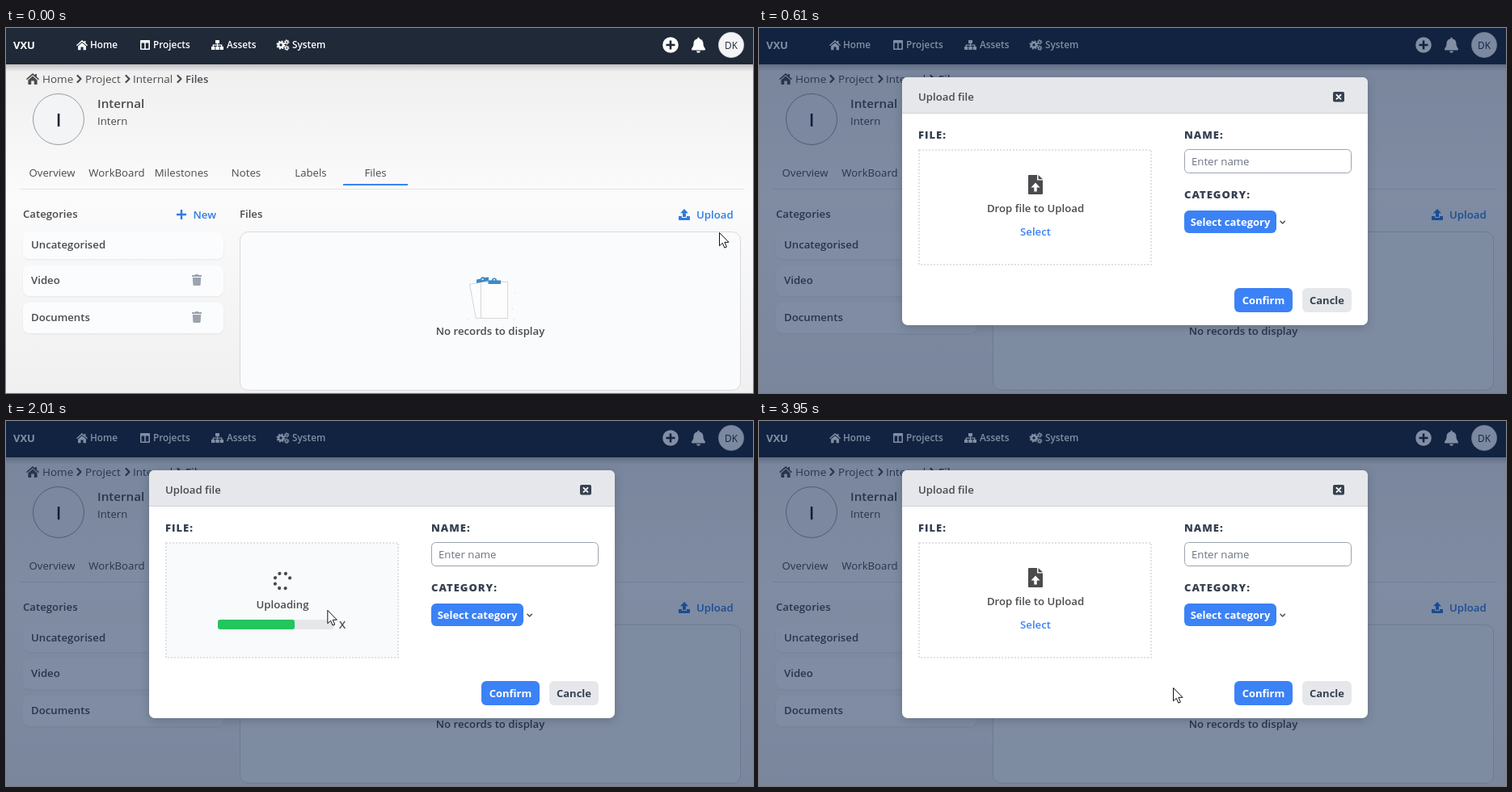
Animation of 924 by 452 pixels, one loop 4030 ms. Source, as an HTML page:

```html
<!DOCTYPE html>
<html lang="en">
<head>
<meta charset="utf-8">
<title>Upload file</title>
<style>
html, body { margin: 0; width: 100%; height: 100%; overflow: hidden; }
svg { display: block; }
text { font: 600 13.2px "Open Sans", "Noto Sans", sans-serif; fill: #4b4b4d; }
.mid { text-anchor: middle; }
.nav text { font-size: 11.8px; fill: #fff; }
.crumb text { font-weight: 400; font-size: 13.5px; }
.light text, text.light { font-weight: 400; }
.caps { font-weight: 800; font-size: 13px; letter-spacing: 1px; fill: #374151; }
.bold { font-weight: 700; font-size: 13px; }
text.blue { fill: #2f7de1; }
text.link { fill: #3b82f6; }
text.white { fill: #fff; }
.line { fill: none; stroke-linecap: round; stroke-linejoin: round; }
.card { fill: #fbfcfd; filter: drop-shadow(0 1px 1px rgba(0,0,0,.06)); }
</style>
</head>
<body>
<svg width="924" height="452" viewBox="0 0 924 452">
<defs>
  <linearGradient id="paper" x2="0" y2="1">
    <stop stop-color="#efeff0"/><stop offset=".4" stop-color="#fbfbfc"/><stop offset="1" stop-color="#f0f0f1"/>
  </linearGradient>
  <linearGradient id="shade" x2="0" y2="1">
    <stop stop-color="#000" stop-opacity=".2"/><stop offset="1" stop-color="#000" stop-opacity="0"/>
  </linearGradient>
  <linearGradient id="glass" x2="0" y2="1">
    <stop stop-color="#eff8fc"/><stop offset="1" stop-color="#cdebf5"/>
  </linearGradient>
  <path id="house" d="M0 7 8 0 11 2.6V1H13V4.4L16 7 15 8.2 8 2.2 1 8.2ZM2.4 8.4 8 3.6 13.6 8.4V14H9.8V9.6H6.2V14H2.4Z"/>
  <path id="chevron" class="line" d="M0 0 4 4 0 8" stroke="#4b4b4d" stroke-width="2.2"/>
  <path id="trash" fill="#9ca3af" d="M0 1H3.6L4.4 0H7.6L8.4 1H12V3H0ZM.8 4H11.2L10.6 13Q10.5 14 9.5 14H2.5Q1.5 14 1.4 13Z"/>
</defs>

<g id="page">
  <rect y="45" width="924" height="407" fill="url(#paper)"/>
  <rect y="45" width="924" height="9" fill="url(#shade)"/>
  <rect width="924" height="45" fill="#1f2937"/>
  <g class="nav" fill="#fff">
    <text x="9" y="26" style="font-weight:700;font-size:13px">VXU</text>
    <use href="#house" transform="translate(87 15) scale(.88)"/>
    <text x="104" y="25">Home</text>
    <path fill-rule="evenodd" d="M167 15H177Q178 15 178 16V26Q178 27 177 27H167Q166 27 166 26V16Q166 15 167 15ZM167.6 18.4V25.4H171.2V18.4ZM172.8 18.4V25.4H176.4V18.4Z"/>
    <text x="182" y="25">Projects</text>
    <path d="M259 15H264V19H262.1V20.4H267.4V23H269V27H264.6V23H266V21.8H262.1V23H263.7V27H259.3V23H260.9V21.8H257V23H258.4V27H254V23H255.6V20.4H260.9V19H259Z"/>
    <text x="273" y="25">Assets</text>
    <g fill="none" stroke="#fff">
      <circle cx="340" cy="21" r="3" stroke-width="2.6"/>
      <circle cx="340" cy="21" r="4.7" stroke-width="1.6" stroke-dasharray="2 1.69"/>
      <circle cx="347.2" cy="17.4" r="1.7" stroke-width="1.4"/>
      <circle cx="347.2" cy="17.4" r="2.8" stroke-width="1" stroke-dasharray="1.5 1.43"/>
      <circle cx="347.2" cy="24.8" r="1.7" stroke-width="1.4"/>
      <circle cx="347.2" cy="24.8" r="2.8" stroke-width="1" stroke-dasharray="1.5 1.43"/>
    </g>
    <text x="354" y="25">System</text>
    <circle cx="822" cy="21" r="9.8"/>
    <path d="M822 15.5V26.5M816.5 21H827.5" stroke="#1f2937" stroke-width="2.6"/>
    <path d="M856.5 11.5Q857.7 11.5 857.7 13.2C861.5 14 862.5 17 862.5 19.5 862.5 23.5 865 24.5 865 26.5Q865 27.5 864 27.5H849Q848 27.5 848 26.5C848 24.5 850.5 23.5 850.5 19.5 850.5 17 851.5 14 855.3 13.2Q855.3 11.5 856.5 11.5ZM854 28.5H859A2.5 2.3 0 0 1 854 28.5Z"/>
    <circle cx="897" cy="21" r="15.7" fill="#f3f4f6" stroke="#d1d5db" stroke-width=".6"/>
    <text class="mid" x="897" y="25.5" style="fill:#1f2937;font-weight:400">DK</text>
  </g>

  <g class="crumb">
    <use href="#house" x="25" y="56" fill="#4b4b4d"/>
    <text x="45" y="68">Home</text><use href="#chevron" x="88.5" y="59"/>
    <text x="98" y="68">Project</text><use href="#chevron" x="148.5" y="59"/>
    <text x="157" y="68">Internal</text><use href="#chevron" x="212.5" y="59"/>
    <text x="222" y="68" style="font-weight:600;font-size:13.2px">Files</text>
  </g>
  <circle cx="65" cy="113" r="31.5" fill="#f3f4f6" stroke="#9a9da3"/>
  <text class="mid" x="65" y="122" style="font-size:22px;fill:#172136">I</text>
  <text x="113" y="99" style="font-size:15.2px">Internal</text>
  <text x="113" y="120" class="light">Intern</text>

  <g class="light mid">
    <text x="57" y="184">Overview</text><text x="137" y="184">WorkBoard</text>
    <text x="217" y="184">Milestones</text><text x="297" y="184">Notes</text>
    <text x="377" y="184">Labels</text><text x="457" y="184">Files</text>
  </g>
  <rect x="17" y="199" width="896" height="1" fill="#e2e4e7"/>
  <rect x="417" y="193" width="80" height="2" fill="#3b82f6"/>

  <text x="21" y="235">Categories</text>
  <path d="M217 225V237M211 231H223" stroke="#2f7de1" stroke-width="2.4"/>
  <text x="231.500" y="236" class="blue">New</text>
  <rect class="card" x="21" y="252" width="248" height="34" rx="8"/>
  <rect class="card" x="21" y="294" width="248" height="38" rx="8"/>
  <rect class="card" x="21" y="340" width="248" height="38" rx="8"/>
  <text x="31" y="273">Uncategorised</text>
  <text x="31" y="317">Video</text><use href="#trash" x="230" y="305"/>
  <text x="31" y="363">Documents</text><use href="#trash" x="230" y="351"/>

  <text x="289" y="235">Files</text>
  <rect id="hover" x="823" y="216" width="86" height="28" rx="6" fill="#e5e7eb"/>
  <path fill="#2f7de1" d="M839 224 844 229.300H841V234H837V229.300H834ZM832 233H836V235H842V233H846V237Q846 238 845 238H833Q832 238 832 237Z"/>
  <text x="854" y="236" class="blue">Upload</text>
  <rect x="289.500" y="252.500" width="619" height="196" rx="10" fill="#fafbfc" stroke="#d7dade"/>
  <g stroke="#d4d6d8" fill="#fdfdfd">
    <path d="M573.500 317.500 602 312 609 355 581.500 360Z"/>
    <path d="M587.500 314.500H620.500V359.500H587.500Z"/>
  </g>
  <g fill="#3b8bc6">
    <path d="M582 311.500 587 310.500A3 3 0 0 1 592 309L597 308.500V313L582 316Z"/>
    <path d="M596.500 312.500H601A3 3 0 0 1 607 312.500H612V317H596.500Z"/>
    <path fill="#fff" d="M588.500 310.500h2v1.500h-2ZM603 311h2v1.500h-2Z"/>
  </g>
  <path d="M573 312h1M629 328h1M626 348h1M570 361h1M628 361h1" stroke="#cfd2d5"/>
  <text class="mid" x="599" y="380">No records to display</text>
</g>

<rect id="overlay" width="924" height="452" fill="#051e4b"/>

<g id="dialog">
  <rect x="177" y="61" width="576" height="307" rx="7" fill="#fff" style="filter:drop-shadow(0 3px 6px rgba(0,0,0,.18))"/>
  <path d="M177 106V68Q177 61 184 61H746Q753 61 753 68V106Z" fill="#e5e7eb"/>
  <rect x="177" y="105" width="576" height="1" fill="#cdd1d6"/>
  <text x="197" y="90">Upload file</text>
  <rect x="710" y="79" width="14" height="12.500" rx="2" fill="#374151"/>
  <path class="line" d="M714.500 82.800 719.500 87.800M719.500 82.800 714.500 87.800" stroke="#fff" stroke-width="1.900"/>
  <text class="caps" x="197" y="137">FILE:</text>
  <text class="caps" x="526" y="137">NAME:</text>
  <text class="caps" x="526" y="211">CATEGORY:</text>
  <rect id="zone" x="198" y="151" width="287" height="142" stroke="#dfe1e4" stroke-width="2" stroke-dasharray="2 2"/>
  <rect x="526.500" y="150.500" width="206" height="29" rx="5" fill="#fff" stroke="#9ca3af"/>
  <text x="535" y="170" class="light" style="fill:#6b7280">Enter name</text>
  <rect x="526" y="226" width="114" height="28" rx="6" fill="#3b82f6"/>
  <text class="mid bold white" x="583" y="245">Select category</text>
  <path class="line" d="M645 239.300 647.700 242 650.400 239.300" stroke="#4b5563" stroke-width="1.600"/>
  <rect x="588" y="322" width="72" height="30" rx="6" fill="#3b82f6"/>
  <text class="mid bold white" x="624" y="342">Confirm</text>
  <rect x="672" y="322" width="61" height="30" rx="6" fill="#e5e7eb"/>
  <text class="mid bold" x="702.500" y="342" style="fill:#374151">Cancle</text>

  <g id="drop">
    <path d="M334 182H344V188.500H351V205Q351 206 350 206H334Q333 206 333 205V183Q333 182 334 182ZM345.500 182 351 187.200H345.500Z" fill="#4b4b4d"/>
    <path d="M342 191.500 347.500 197.500H343.700V202.500H340.300V197.500H336.500Z" fill="#fff"/>
    <text class="mid" x="342" y="228">Drop file to Upload</text>
    <text class="mid link" x="342" y="257">Select</text>
  </g>
  <g id="progress">
    <g id="spinner" fill="#4b4b4d"></g>
    <g id="check">
      <circle cx="342" cy="198" r="11.800" fill="#4b4b4d"/>
      <path d="M336 198.500 340.300 202.600 348 194.600" fill="none" stroke="#fff" stroke-width="3"/>
    </g>
    <text id="status" class="mid" x="342" y="232"></text>
    <rect x="262" y="246" width="144" height="12" rx="3" fill="#e5e7eb"/>
    <rect id="bar" x="262" y="246" height="12" rx="3" fill="#22c55e"/>
    <text class="mid" x="416" y="257">X</text>
  </g>
</g>

<g id="pointer">
  <g id="ghost">
    <rect x="-51" y="-93" width="103.500" height="105" rx="1" fill="url(#glass)" stroke="#d3e6ec" opacity=".95" style="filter:drop-shadow(1px 1px 1px rgba(40,90,100,.45))"/>
  </g>
  <circle id="halo" r="11.500" fill="#f6f03c" opacity=".85"/>
  <g id="label">
    <rect x="11" y="13" width="56" height="19" fill="#fff" stroke="#666"/>
    <path class="line" d="M14 22.500H25M20.500 18 25 22.500 20.500 27" stroke="#2a48c4" stroke-width="1.200"/>
    <text x="30.500" y="27" class="light" style="font-size:12px;fill:#2a48c4">Move</text>
  </g>
  <path d="M0 0V16.300L3.800 12.800 6.300 18.700 8.900 17.600 6.400 11.800H11.500Z" fill="#fff" stroke="#111"/>
</g>
</svg>

<script>
const LOOP = 4030;
const $ = id => document.getElementById(id);

// Moments at which the picture is refreshed.
const ticks = [0, 90, 160, 240, 320, 400, 480, 530, 610, 830, 910, 990, 1060, 1140, 1230, 1320,
  1380, 1460, 1540, 1630, 1700, 1780, 1860, 1940, 2010, 2090, 2160, 2240, 2310, 2390, 2470,
  3100, 3170, 3250, 3400, 3570, 3880, 3950];

// Pointer tip: time, x, y.
const path = [
  [0, 882.5, 253.5], [90, 881, 250], [240, 871, 235], [400, 867.5, 231.5],
  [610, 867.5, 231.5], [830, 593, 222], [990, 449.5, 224.5], [1060, 410, 224.5],
  [1140, 382, 225], [1230, 374.5, 225], [1320, 396, 224.5], [1860, 396, 224.5],
  [2390, 402.5, 259.5], [2470, 402.5, 259.5], [3050, 402.5, 259.5], [3250, 412, 251],
  [3400, 412, 251], [3570, 411.5, 255.5], [3800, 411.5, 255.5], [3950, 512.5, 330.5], [LOOP, 512.5, 330.5]
];

function along(t) {
  const i = path.findIndex(p => p[0] > t);
  const [a, b] = [path[i - 1], path[i]];
  const k = (t - a[0]) / (b[0] - a[0]);
  return [1, 2].map(n => a[n] + (b[n] - a[n]) * k);
}

const during = (t, from, to) => t >= from && t < to;
const show = (id, on) => $(id).setAttribute("visibility", on ? "inherit" : "hidden");

// Seven dots on a ring, with the upper right one left out.
for (let i = 0; i < 7; i++) {
  const angle = i * Math.PI / 4;
  $("spinner").innerHTML += `<circle r="2.1" cx="${342 + 9.8 * Math.cos(angle)}" cy="${198 + 9.8 * Math.sin(angle)}"/>`;
}

function draw(t) {
  const dragging = during(t, 830, 1380);
  const uploading = during(t, 1380, 2470);
  const done = during(t, 2470, 3570);

  show("hover", during(t, 160, 610));
  $("overlay").setAttribute("opacity", t < 530 ? 0 : t < 610 ? 0.25 : 0.5);
  show("dialog", t >= 480);
  if (t >= 480) {
    show("drop", t < 1380 || t >= 3880);
    show("progress", uploading || done);
  } else {
    show("drop", false);
    show("progress", false);
  }
  $("drop").style.display = t >= 480 ? "" : "none";
  $("progress").style.display = uploading || done ? "" : "none";
  show("spinner", uploading);
  show("check", done);
  $("spinner").setAttribute("transform", `rotate(${(t - 1630) * 0.18} 342 198)`);
  $("status").textContent = done ? "Success" : "Uploading";
  $("bar").setAttribute("width", 144 * Math.min(1, Math.max(0, (t - 1350) / 1000)));
  $("zone").setAttribute("fill", during(t, 1380, 3880) ? "#f8fafc" : "#fff");

  show("pointer", t < 610 || t >= 830);
  show("ghost", dragging);
  show("label", dragging);
  show("halo", dragging || during(t, 3400, 3570));
  $("pointer").setAttribute("transform", `translate(${along(t)})`);
}

const start = performance.now();
function frame() {
  const now = (performance.now() - start) % LOOP;
  draw(ticks.findLast(tick => tick <= now));
  requestAnimationFrame(frame);
}
frame();
</script>
</body>
</html>
```
